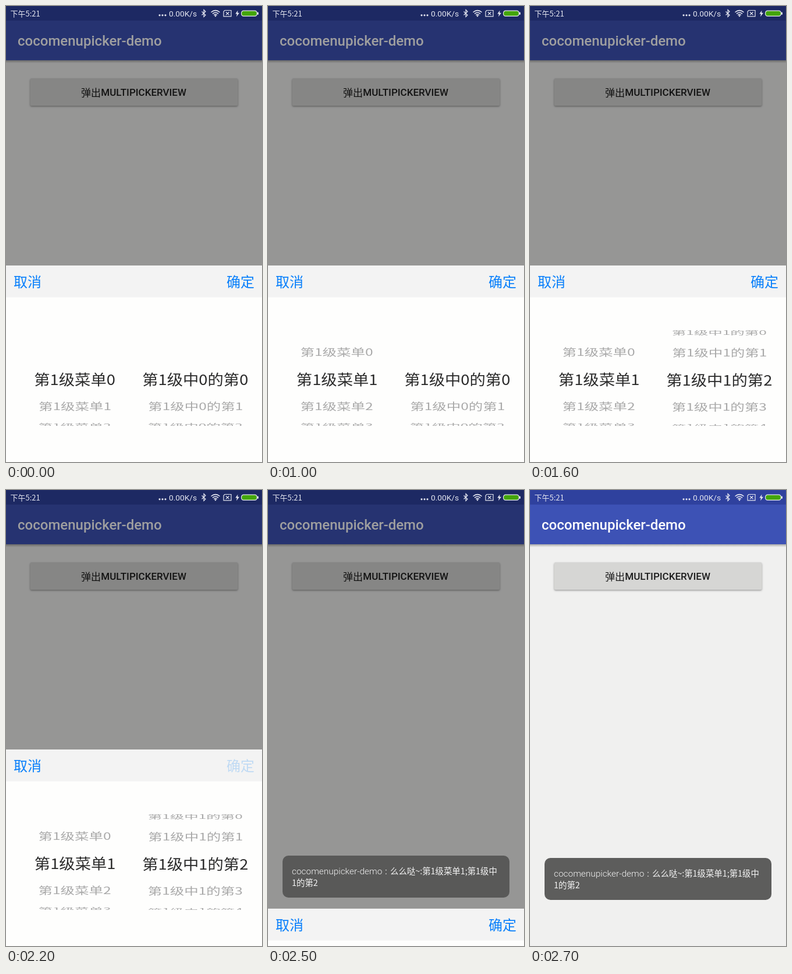
Recreate the animation shown at these times as an HTML page with a canvas. Size 440x782 px, loop 2800 ms.

```html
<!DOCTYPE html>
<html lang="zh">
<head>
<meta charset="utf-8">
<style>
html, body { margin: 0; width: 100%; height: 100%; overflow: hidden; background: #f0f0ef; }
canvas { display: block; }
</style>
</head>
<body>
<canvas id="stage" width="440" height="782"></canvas>
<script>
const ctx = document.getElementById('stage').getContext('2d');
const LOOP = 2800, STEP = 100;
const CJK = '"Noto Sans CJK SC", "Noto Sans CJK JP", "Noto Sans CJK", sans-serif';
const LATIN = 'Roboto, "Noto Sans CJK SC", "Noto Sans CJK", sans-serif';
const WHEEL = { y: 640.3, radius: 92.5, step: Math.PI / 6, top: 556, bottom: 720, line1: 616.5, line2: 664.5 };

const clamp = u => Math.max(0, Math.min(1, u));
const smooth = u => u * u * (3 - 2 * u);

// Eased value through [time, value] points
function along(points, t) {
  let v = points[0][1];
  for (let i = 1; i < points.length; i++) {
    const [t0, v0] = points[i - 1], [t1, v1] = points[i];
    if (t >= t0) v = v0 + (v1 - v0) * smooth(clamp((t - t0) / (t1 - t0)));
  }
  return v;
}

function text(str, x, y, size, color, family = CJK, weight = 400) {
  ctx.font = `${weight} ${size}px ${family}`;
  ctx.fillStyle = color;
  ctx.fillText(str, x, y);
}

function rect(x, y, w, h, color) {
  ctx.fillStyle = color;
  ctx.fillRect(x, y, w, h);
}

function round(x, y, w, h, r, color) {
  ctx.fillStyle = color;
  ctx.beginPath();
  ctx.roundRect(x, y, w, h, r);
  ctx.fill();
}

function stroke(path, color = '#e4e6f0', width = 1.2) {
  ctx.strokeStyle = color;
  ctx.lineWidth = width;
  ctx.stroke(new Path2D(path));
}

function clipped(y0, y1, draw) {
  if (y1 <= y0) return;
  ctx.save();
  ctx.beginPath();
  ctx.rect(0, y0, 440, y1 - y0);
  ctx.clip();
  draw();
  ctx.restore();
}

function page() {
  rect(0, 0, 440, 782, '#f0f0ef');
  const shade = ctx.createLinearGradient(0, 93, 0, 98);
  shade.addColorStop(0, 'rgba(0,0,0,.3)');
  shade.addColorStop(1, 'rgba(0,0,0,0)');
  rect(0, 93, 440, 5, shade);
  rect(0, 25, 440, 68, '#3d52b5');
  rect(0, 0, 440, 25, '#2f419e');
  text('cocomenupicker-demo', 20, 68, 24, '#fff', LATIN, 500);

  ctx.save();
  ctx.shadowColor = 'rgba(0,0,0,.35)';
  ctx.shadowBlur = 3;
  ctx.shadowOffsetY = 1.5;
  round(41.5, 124, 357, 47, 2.5, '#d6d6d4');
  ctx.restore();
  text('弹出', 129, 154.5, 17, '#1c1c1c');
  text('MULTIPICKERVIEW', 163.3, 154, 17, '#1c1c1c', LATIN, 500);
}

function statusBar() {
  const ink = '#e4e6f0';
  text('下午5:21', 7.5, 17.5, 13, ink);
  for (const x of [264, 269, 274]) round(x - 1.6, 14.2, 3.2, 3.2, 1.6, ink);
  text('0.00K/s', 280, 18, 13.7, ink, LATIN);
  stroke('M336.5 9.5 L343 15.5 L340 18.5 V6.5 L343 9.5 L336.5 15.5');
  stroke('M352.5 10.8 Q360 4.5 367.5 10.8 M355 13.4 Q360 9 365 13.4 M357.3 15.8 Q360 13.4 362.7 15.8', ink, 1.5);
  round(358.8, 16, 2.4, 2.4, 1.2, ink);
  stroke('M376 7.5 H387 V17.8 H374 V9.5 Z M378 10.2 L383.5 15.4 M383.5 10.2 L378 15.4');
  ctx.fillStyle = ink;
  ctx.fill(new Path2D('M398.5 7.5 L394.3 13.6 H397 L396 18.5 L401 11.8 H398 Z'));
  round(404, 7.5, 28, 10.5, 4.5, ink);
  round(432, 10.5, 2, 4.5, 1, ink);
  round(405.2, 8.7, 25.6, 8.1, 3.5, '#43a50c');
}

// One row, centred on its ink and squeezed by the turn of the wheel
function row(str, cx, cy, sx, sy, color) {
  ctx.save();
  ctx.translate(cx, cy);
  ctx.scale(sx, sy);
  ctx.font = `400 24.5px ${CJK}`;
  const m = ctx.measureText(str);
  text(str, (m.actualBoundingBoxLeft - m.actualBoundingBoxRight) / 2, 9.3, 24.5, color);
  ctx.restore();
}

function wheel(cx, label, pos, shift) {
  const { y, radius, step, top, bottom, line1, line2 } = WHEEL;
  for (let i = 0; i < 10; i++) {
    const a = (i - pos) * step;
    if (Math.abs(a) >= Math.PI / 2) continue;
    const cy = y + radius * Math.sin(a), k = Math.cos(a);
    const outer = () => row(label + i, cx, cy, 1, k * 0.8, '#a9a9a9');
    clipped(top + shift, line1, outer);
    clipped(line1, line2, () => row(label + i, cx, cy, 1.115, k, '#2a2a2a'));
    clipped(line2, bottom, outer);
  }
}

function sheet(t) {
  const slide = 337 * clamp((t - 2230) / 300) ** 2;
  ctx.save();
  ctx.translate(0, slide);
  rect(0, 445, 440, 337, '#fefefd');
  rect(0, 445, 440, 54.5, '#f3f3f3');
  text('取消', 13, 482, 24, '#087ffb');
  text('确定', 379, 482, 24, t === 2200 ? '#bfdaf4' : '#087ffb');
  const left = along([[100, 0], [550, 1.38], [850, 1]], t);
  const right = along([[1100, 0], [1600, 1.98]], t);
  wheel(118.3, '第1级菜单', left, 0);
  wheel(325.5, `第1级中${t < 1100 ? 0 : 1}的第`, right, 0);
  ctx.restore();
}

function toast(t) {
  if (t < 2400) return;
  const y = along([[2400, 645], [2500, 627], [2700, 631]], t);
  ctx.save();
  ctx.globalAlpha = t < 2500 ? 0.5 : 1;
  ctx.translate(0, y);
  round(25, 0, 390, 72, 10, 'rgba(86,86,85,.95)');
  text('cocomenupicker-demo', 41, 32, 15.4, '#f4f4f4', LATIN, 300);
  text(':', 201, 32, 15.4, '#f4f4f4', LATIN);
  text('么么哒~:第1级菜单1;第1级中', 210, 32.3, 14.4, '#f4f4f4', CJK, 300);
  text('1的第2', 41, 51.7, 14.4, '#f4f4f4', CJK, 300);
  ctx.restore();
}

function frame() {
  const t = Math.floor(performance.now() % LOOP / STEP) * STEP;
  page();
  if (t < 2600) {
    rect(0, 0, 440, 782, 'rgba(0,0,0,.375)');
    sheet(t);
  }
  statusBar();
  toast(t);
  requestAnimationFrame(frame);
}
frame();
</script>
</body>
</html>
```
